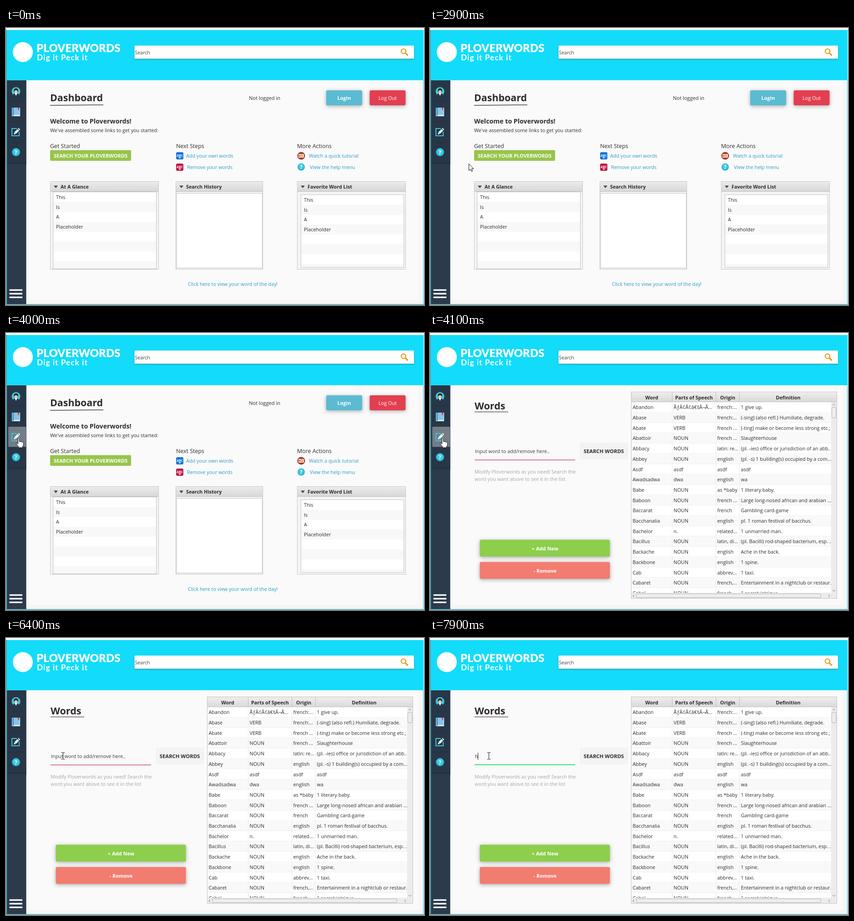
An HTML page with a canvas for the animation above (8000 ms loop, 919x609 px).

```html
<!DOCTYPE html>
<html lang="en">
<head>
<meta charset="utf-8">
<title>Ploverwords</title>
<style>
html, body { margin: 0; width: 100%; height: 100%; overflow: hidden; background: #fafafa; }
canvas { display: block; }
</style>
</head>
<body>
<canvas id="stage" width="919" height="609"></canvas>
<script>
const c = document.getElementById('stage').getContext('2d');
const LOOP = 8000, STEP = 100;
const PAGE_AT = 4100, FOCUS_AT = 7100, TYPE_AT = 7800;
const SANS = '"Open Sans", "Noto Sans", sans-serif';
const INK = '#2c2c2c', LINK = '#2a9bc9', CYAN = '#12dcfa';

// Pointer path: time, x, y
const PATH = [
  [2400, 150, 400], [2800, 85, 298], [3400, 85, 298], [3700, 58, 258],
  [3900, 28, 232], [4200, 28, 232], [4500, 62, 246], [5000, 118, 257],
  [6400, 125, 259], [7000, 129, 259], [8000, 129, 259]
];

const WORDS = [
  ['Abandon', 'ÃƒÂ¢Ã¢â€šÂ¬Ã...', 'french:...', '1 give up.'],
  ['Abase', 'VERB', 'french:...', '(-sing) (also refl.) Humiliate, degrade.'],
  ['Abate', 'VERB', 'french ...', '(-ting) make or become less strong etc.;'],
  ['Abattoir', 'NOUN', 'french ...', 'Slaughterhouse'],
  ['Abbacy', 'NOUN', 'latin: re...', '(pl. -ies) office or jurisdiction of an abb...'],
  ['Abbey', 'NOUN', 'english', '(pl. -s) 1 building(s) occupied by a com...'],
  ['Asdf', 'asdf', 'asdf', 'asdf'],
  ['Awadsadwa', 'dwa', 'english', 'wa'],
  ['Babe', 'NOUN', 'as *baby', '1 literary baby.'],
  ['Baboon', 'NOUN', 'french ...', 'Large long-nosed african and arabian ...'],
  ['Baccarat', 'NOUN', 'french', 'Gambling card-game'],
  ['Bacchanalia', 'NOUN', 'english', 'pl. 1 roman festival of bacchus.'],
  ['Bachelor', 'n.', 'related...', '1 unmarried man.'],
  ['Bacillus', 'NOUN', 'latin, di...', '(pl. Bacilli) rod-shaped bacterium, esp. ...'],
  ['Backache', 'NOUN', 'english', 'Ache in the back.'],
  ['Backbone', 'NOUN', 'english', '1 spine.'],
  ['Cab', 'NOUN', 'abbrev...', '1 taxi.'],
  ['Cabaret', 'NOUN', 'french,...', 'Entertainment in a nightclub or restaur...'],
  ['Cabal', 'NOUN', 'french ...', '1 secret intrigue.']
];

function text(s, x, y, size = 10.8, color = INK, weight = 400, align = 'left', family = SANS) {
  c.font = `${weight} ${size}px ${family}`;
  c.fillStyle = color;
  c.textAlign = align;
  c.fillText(s, x, y);
}

function rect(x, y, w, h, color) {
  c.fillStyle = color;
  c.fillRect(x, y, w, h);
}

function frame(x, y, w, h, color) {
  c.strokeStyle = color;
  c.lineWidth = 1;
  c.strokeRect(x + .5, y + .5, w - 1, h - 1);
}

function round(x, y, w, h, r, color) {
  c.fillStyle = color;
  c.beginPath();
  c.roundRect(x, y, w, h, r);
  c.fill();
}

function raised(x, y, w, h, r, color, blur = 9, dy = 2) {
  c.save();
  c.shadowColor = 'rgba(0,0,0,.32)';
  c.shadowBlur = blur;
  c.shadowOffsetY = dy;
  round(x, y, w, h, r, color);
  c.restore();
}

function disc(x, y, r, color) {
  c.fillStyle = color;
  c.beginPath();
  c.arc(x, y, r, 0, 7);
  c.fill();
}

function line(pts, color, width = 1) {
  c.strokeStyle = color;
  c.lineWidth = width;
  c.beginPath();
  pts.forEach(p => c.lineTo(...p));
  c.stroke();
}

function poly(pts, color) {
  c.fillStyle = color;
  c.beginPath();
  pts.forEach(p => c.lineTo(...p));
  c.closePath();
  c.fill();
}

function shade(x, y, w, h, top, bottom) {
  const g = c.createLinearGradient(0, y, 0, y + h);
  g.addColorStop(0, top);
  g.addColorStop(1, bottom);
  rect(x, y, w, h, g);
}

function clipped(x, y, w, h, draw) {
  c.save();
  c.beginPath();
  c.rect(x, y, w, h);
  c.clip();
  draw();
  c.restore();
}

function helpIcon(x, y, r) {
  disc(x, y, r, '#25b4cf');
  disc(x, y - 1, r - 1.5, '#3cc8e0');
  text('?', x, y + 4.5, 12.5, '#fff', 700, 'center');
}

function header() {
  rect(0, 0, 919, 609, '#fafafa');
  rect(908, 115, 10, 493, '#f5f5f5');
  rect(44, 598, 874, 10, '#f5f5f5');
  rect(0, 0, 919, 5, '#fdfefe');
  rect(1, 4.5, 917, 110.3, CYAN);
  disc(37, 53, 22, '#fff');
  text('PLOVERWORDS', 67, 53, 24, '#fff', 900, 'left', 'Lato, sans-serif');
  c.letterSpacing = '1px';
  text('Dig it Peck it', 68, 71, 17.3, '#fff', 700, 'left', 'Lato, sans-serif');
  c.letterSpacing = '0px';
  raised(282.5, 38.5, 614.5, 29.5, 2, '#fff', 3, 1);
  rect(283, 67, 613, 1, '#b9c6ca');
  text('Search', 283.5, 58, 10.6, '#444');
  c.strokeStyle = '#ee920c';
  c.lineWidth = 2.2;
  c.beginPath();
  c.arc(874, 51, 5, 0, 7);
  c.stroke();
  line([[878, 55], [883.5, 60.5]], '#ee920c', 3);
}

function avatar() {
  disc(22, 139.5, 9.5, '#40cbe0');
  clipped(12, 130, 20, 18.7, () => {
    disc(22, 149.5, 6.8, '#2a3442');
    poly([[19, 143], [25, 143], [22, 149]], '#fff');
    disc(22, 137.5, 4.8, '#20242c');
    disc(22, 140, 3.3, '#f0c8a4');
  });
}

function editIcon() {
  c.strokeStyle = '#36c7df';
  c.lineWidth = 2;
  c.beginPath();
  c.moveTo(24, 221);
  c.lineTo(13, 221);
  c.lineTo(13, 237);
  c.lineTo(29, 237);
  c.lineTo(29, 228);
  c.stroke();
  line([[20.5, 230.5], [27, 224]], '#fff', 5);
  line([[28, 223], [29.5, 221.5]], '#fff', 5);
  poly([[17, 234], [18.3, 229.3], [21.7, 232.7]], '#fff');
}

function sidebar(hover) {
  rect(2, 115, 42.5, 492, '#2b3b4c');
  shade(2, 295, 42.5, 6, '#202e3c', '#2b3b4c');
  rect(2, 115, 42.5, 180, '#273748');
  for (let i = 1; i < 4; i++) rect(2, 116 + i * 44.7, 42.5, 1, '#223141');
  if (hover >= 0) round(5, 206 + (hover - 2) * 44.7, 39.5, 44.5, 2, '#747c86');

  avatar();
  round(13, 175, 18, 19, 1, '#d8edf5');
  rect(14, 175, 3, 18, '#488fc8');
  rect(17, 175, 13, 16, '#87c4ea');
  poly([[26, 175], [29, 175], [29, 181], [27.5, 179.5], [26, 181]], '#d7445b');
  editIcon();
  helpIcon(22, 273, 9);
  for (const y of [574.5, 582.5, 590.5]) rect(7.5, y, 28.5, 3.3, '#fff');
}

function edges() {
  rect(0, 4, 1, 605, '#82868a');
  rect(1, 4, 1, 605, '#27c3dc');
  rect(917, 115, 1, 493, '#35c8dd');
  rect(1, 607, 917, 1, '#2bb5c9');
  rect(0, 608, 919, 1, '#9fb1b4');
}

function panel(title, x, w, list, items) {
  rect(x, 337, w, 194, '#f4f4f4');
  shade(x, 337, w, 23, '#ececec', '#d7d7d7');
  frame(x, 337, w, 23, '#bfbfbf');
  frame(x, 337, w, 194, '#c6c6c6');
  poly([[x + 8, 346.5], [x + 17, 346.5], [x + 12.5, 352]], '#444');
  text(title, x + 23, 353, 10.8, INK, 700);
  const [lx, ly, lw, lh] = list;
  rect(lx, ly, lw, lh, '#fff');
  if (items) {
    for (let y = ly + 22.7; y < ly + lh - 1; y += 43.4)
      rect(lx, y, lw, Math.min(21.7, ly + lh - y), '#f8f8f8');
    items.forEach((s, i) => text(s, lx + 7, ly + 16 + i * 21.7));
  }
  frame(lx, ly, lw, lh, '#c4c4c4');
}

function badge(x, y, color) {
  round(x, y, 16, 16, 3, color);
  text('ABC', x + 8, y + 9.5, 6.8, '#fff', 700, 'center');
  poly([[x + 5, y + 11], [x + 11, y + 11], [x + 8, y + 14]], '#fff');
}

function dashboard() {
  text('Dashboard', 97, 161, 21.4, '#2d2d2d', 700);
  line([[97, 170], [214, 169]], '#444', 1.4);
  text('Not logged in', 534, 158, 11.1);
  raised(704, 137, 79, 33, 3, '#5bbbd1');
  text('Login', 743.5, 158, 11, '#fff', 700, 'center');
  raised(799.5, 137, 79, 33, 3, '#e23f50');
  text('Log Out', 839, 158, 11, '#fff', 400, 'center');

  text('Welcome to Ploverwords!', 97, 209.5, 14.2, '#2d2d2d', 700);
  text("We've assembled some links to get you started:", 97, 229);
  text('Get Started', 97, 263.5, 12.4);
  text('Next Steps', 374, 263.5, 12.4);
  text('More Actions', 640, 263.5, 12.4);
  round(97, 268.5, 178, 23.5, 2, '#97c54a');
  text('SEARCH YOUR PLOVERWORDS', 186, 284.5, 11, '#fff', 700, 'center');

  badge(374, 273, '#1376d6');
  badge(374, 298, '#bd1a47');
  text('Add your own words', 396, 285, 10.8, LINK);
  text('Remove your words', 398, 310, 10.8, LINK);
  disc(649, 281, 8.5, '#a8383c');
  round(643, 277, 12, 8, 1, '#f5e3bd');
  rect(644, 279, 4, 4, '#d98a34');
  rect(649, 279, 4, 1, '#7b5a45');
  rect(649, 282, 4, 1, '#7b5a45');
  helpIcon(649, 305.5, 8);
  text('Watch a quick tutorial', 666, 285, 10.8, LINK);
  text('View the help menu', 668, 309.5, 10.8, LINK);

  const items = ['This', 'Is', 'A', 'Placeholder'];
  panel('At A Glance', 97, 239, [103, 360, 228, 170], items);
  panel('Search History', 373, 192, [374, 363, 190, 165]);
  panel('Favorite Word List', 640, 239, [648, 366, 227, 161], items);
  text('Click here to view your word of the day!', 400, 567, 10.8, LINK);
}

function table() {
  const cols = [442, 532, 628, 680, 894], rowH = 22.7;
  rect(442, 129, 453, 455, '#fff');
  clipped(442, 152, 440, 419, () => {
    WORDS.forEach((row, i) => {
      const y = 152 + i * rowH;
      if (i % 2) rect(442, y, 440, rowH, '#f9f9f9');
      rect(442, y + rowH - 1, 440, 1, '#f0f0f0');
      row.forEach((s, k) => clipped(cols[k], y, cols[k + 1] - cols[k] - 1, rowH,
        () => text(s, cols[k] + 3.5, y + 15.3)));
    });
    for (const x of cols.slice(1, 4)) rect(x, 152, 1, 419, '#ebebeb');
  });
  shade(442, 129, 453, 23, '#efefef', '#d9d9d9');
  rect(442, 151, 453, 1, '#c2c2c2');
  ['Word', 'Parts of Speech', 'Origin', 'Definition'].forEach((s, i) => {
    text(s, (cols[i] + cols[i + 1]) / 2 + .5, 145.5, 10.8, INK, 700, 'center');
    rect(cols[i], 130, 1, 22, '#c2c2c2');
  });

  rect(882, 152, 12, 431, '#ececec');
  rect(443, 571, 451, 12, '#ececec');
  round(883, 163, 10, 24, 3, '#b5b5b5');
  round(884, 164, 8, 22, 2, '#eeeeee');
  round(453, 573, 407, 9, 3, '#b5b5b5');
  round(454, 574, 405, 7, 2, '#eeeeee');
  const dark = '#777';
  line([[885, 159], [888, 156], [891, 159]], dark);
  line([[885, 565], [888, 568], [891, 565]], dark);
  line([[449, 575], [446, 578], [449, 581]], dark);
  line([[876, 575], [879, 578], [876, 581]], dark);
  frame(442, 129, 453, 455, '#c2c2c2');
}

function wordsPage(t) {
  text('Words', 98, 168, 21.6, '#2d2d2d', 700);
  line([[98, 173.5], [172, 173.5]], '#6d5a55', 1.3);

  if (t < TYPE_AT) text('Input word to add/remove here..', 99, 264, 10.8, '#3c3c3c');
  else {
    text('h', 99, 264);
    rect(105, 252, 1, 16, '#222');
  }
  const half = 110.5 * Math.min(1, Math.max(0, (t - FOCUS_AT) / 300));
  if (half < 110.5) rect(98, 278.5, 221, 1.2, '#c72767');
  if (half) rect(208.5 - half, 277.5, half * 2, 2, '#2fe272');

  round(329, 241, 107, 37, 3, '#f3f3f3');
  text('SEARCH WORDS', 382, 264, 11.3, INK, 700, 'center');
  text('Modify Ploverwords as you need! Search the', 98, 309, 10.8, '#a6a6a6');
  text('word you want above to see it in the list', 98, 325, 10.8, '#a6a6a6');
  raised(109.5, 454.5, 286, 37, 3, '#8dce4d');
  text('+ Add New', 253, 477.5, 11.1, '#fff', 700, 'center');
  raised(109.5, 503.5, 286, 37, 3, '#f27c70');
  text('- Remove', 253, 526.5, 11.1, '#fff', 700, 'center');
  table();
}

function pointerAt(t) {
  const i = PATH.findIndex(p => p[0] > t);
  if (i < 1) return null;
  const [t0, x0, y0] = PATH[i - 1], [t1, x1, y1] = PATH[i];
  const k = (t - t0) / (t1 - t0);
  return { x: x0 + (x1 - x0) * k, y: y0 + (y1 - y0) * k };
}

function outlined(d, x, y) {
  c.save();
  c.translate(Math.round(x), Math.round(y));
  const p = new Path2D(d);
  c.fillStyle = '#fff';
  c.strokeStyle = '#111';
  c.lineWidth = 1;
  c.lineJoin = 'round';
  c.fill(p);
  c.stroke(p);
  c.restore();
}

function pointer({ x, y }, hover, onWords) {
  if (hover >= 0) {
    outlined('M-1.5 .5Q0-1.5 1.5.5V7Q3 5.5 4.5 7.5Q6 6 7.5 8Q9.5 7 10.5 9V14L8.5 18V20H-.5V18L-5.5 11.5Q-5.5 9-3 10.5L-1.5 12Z', x, y);
  } else if (onWords && x > 98 && x < 319 && y > 243 && y < 279) {
    const px = Math.round(x), py = Math.round(y);
    rect(px, py - 7, 1, 14, '#111');
    for (const dy of [-8, 7]) {
      rect(px - 3, py + dy, 3, 1, '#111');
      rect(px + 1, py + dy, 3, 1, '#111');
    }
  } else {
    outlined('M.5.5V15.5L4 12.3L6.3 17.5L8.7 16.5L6.4 11.4H10.8Z', x, y);
  }
}

function draw(now) {
  const t = Math.floor(now % LOOP / STEP) * STEP;
  const p = pointerAt(t), onWords = t >= PAGE_AT;
  const hover = p && p.x < 44 ? Math.floor((p.y - 116.6) / 44.7) : -1;
  header();
  sidebar(hover);
  if (onWords) wordsPage(t);
  else dashboard();
  edges();
  if (p) pointer(p, hover, onWords);
}

let start;
function tick(now) {
  start ??= now;
  draw(now - start);
  requestAnimationFrame(tick);
}
requestAnimationFrame(tick);
</script>
</body>
</html>
```
